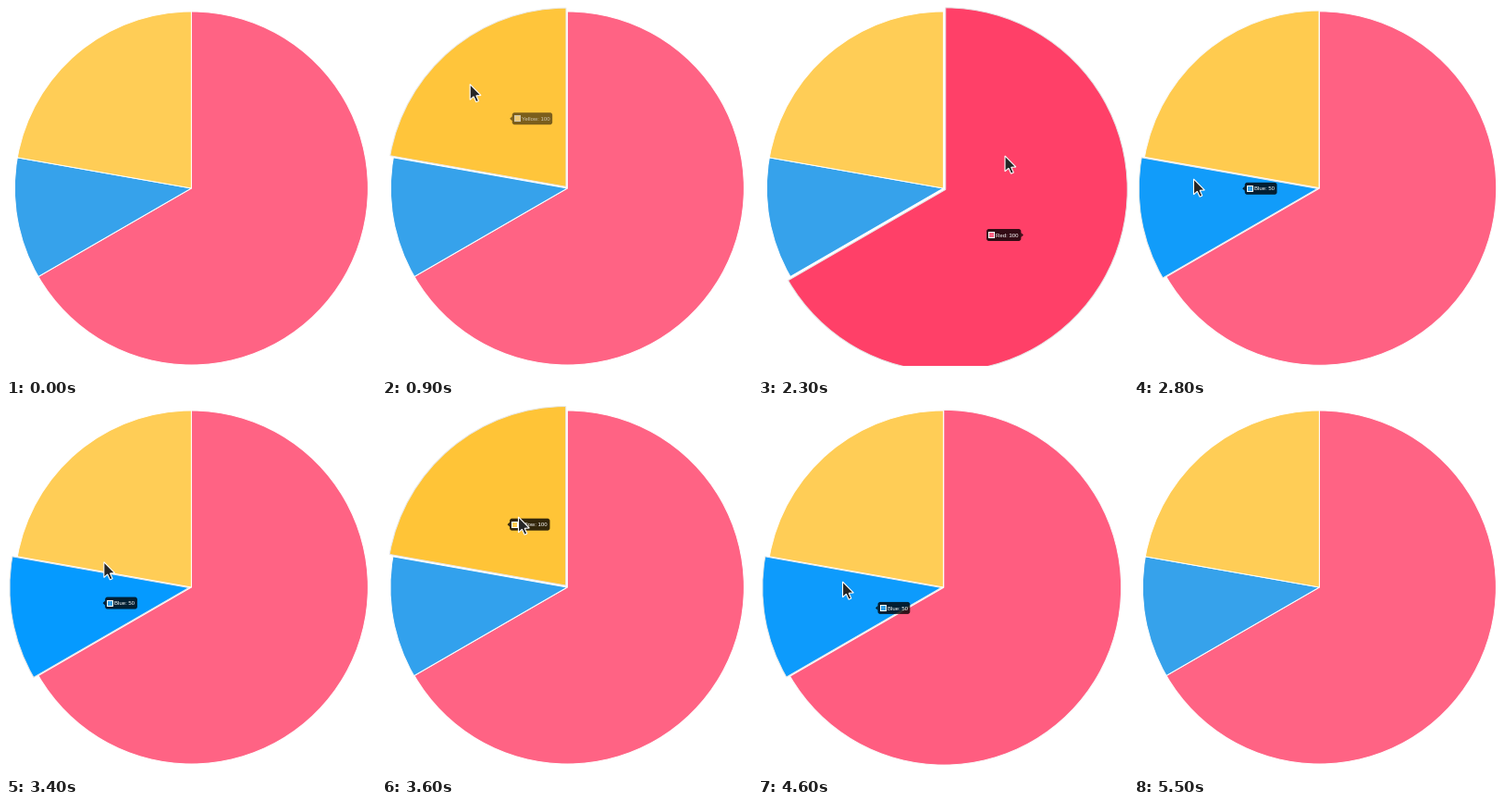
Recreate the animation shown at these times as a matplotlib script. Size 400 by 401 pixels, loop 6000 ms.

```python
import colorsys

import matplotlib.pyplot as plt
import numpy as np
from matplotlib.animation import FuncAnimation
from matplotlib.colors import to_rgb
from matplotlib.patches import FancyBboxPatch, Polygon, Rectangle, Wedge

W, H, DPI = 400, 401, 64
PX = 72 / DPI
STEP, LOOP = 100, 6000
CENTER, RADIUS = np.array([200.4, 197.0]), 191
OFFSET = 2.75
TIP_H, TIP_GAP, CARET = 13, 3.5, 2.5
FLOOR = 389.3

LABELS = ["Red", "Blue", "Yellow"]
VALUES = np.array([300, 50, 100])
COLORS = [np.array(to_rgb(c)) for c in ("#ff6384", "#36a2eb", "#ffcd56")]
RED, BLUE, YELLOW, NONE = 0, 1, 2, -1

# when the pointer enters each slice
HOVERS = [(770, YELLOW), (1473, RED), (2540, YELLOW), (2680, BLUE),
          (3413, YELLOW), (4060, RED), (4453, BLUE), (5100, YELLOW),
          (5210, NONE)]

# pointer stops: time, x, y
STOPS = np.array([
    (800, 75, 80), (1500, 216, 112), (2100, 267, 162), (2500, 267, 162),
    (2800, 64.5, 187), (3300, 85, 194), (3600, 147.5, 121),
    (4250, 236, 176), (4600, 91.5, 191), (5210, 17, 142),
])
ARROW = np.array([(0, 0), (0, 16.8), (3.9, 13.3), (6.6, 19.2), (9.3, 18),
                  (6.7, 12.3), (11.8, 12)])


def hover_color(color):
    """More saturated and a little darker."""
    h, l, s = colorsys.rgb_to_hls(*color)
    return np.array(colorsys.hls_to_rgb(h, l * 0.9, min(s * 1.5, 1)))


def ease_out(u):
    return 1 - (1 - np.clip(u, 0, 1)) ** 4


def chase(goals, pos, t, span=400):
    """Follow a list of (time, goal); each one restarts from where it is."""
    pos = np.array(pos, float)
    ends = [start for start, _ in goals[1:]] + [LOOP]
    for (start, goal), end in zip(goals, ends):
        if t <= start:
            break
        pos += (np.array(goal) - pos) * ease_out((min(t, end) - start) / span)
    return pos


fig = plt.figure(figsize=(W / DPI, H / DPI), dpi=DPI, facecolor="white")
ax = fig.add_axes([0, 0, 1, 1])
ax.set_xlim(0, W)
ax.set_ylim(H, 0)
ax.axis("off")

# slices run clockwise from the top
bounds = np.concatenate([[0], np.cumsum(VALUES)]) / VALUES.sum() * 360 - 90
mids = np.radians((bounds[:-1] + bounds[1:]) / 2)
dirs = np.column_stack([np.cos(mids), np.sin(mids)])
# slices of half the pie or more grow twice as far
growth = OFFSET * np.where(np.diff(bounds) >= 180, 2, 1)

canvas = Rectangle((0, 0), W, FLOOR, transform=ax.transData)
wedges = []
for start, end in zip(bounds[:-1], bounds[1:]):
    wedge = ax.add_patch(Wedge(CENTER, RADIUS, start, end, lw=PX,
                               joinstyle="bevel"))
    wedge.set_clip_path(canvas)
    wedges.append(wedge)

tip_box = FancyBboxPatch((0, 0), 10, TIP_H, lw=0, fc="black", zorder=5,
                         boxstyle="round,pad=0,rounding_size=2.6")
caret = Polygon(np.zeros((3, 2)), lw=0, fc="black", zorder=5)
key_frame = Rectangle((0, 0), 7, 7, lw=0, fc="white", zorder=6)
key_fill = Rectangle((0, 0), 5, 5, lw=0, zorder=7)
for patch in (tip_box, caret, key_frame, key_fill):
    ax.add_patch(patch)
tip_text = ax.text(0, 0, "", family="Liberation Sans", size=6 * PX,
                   color="white", va="baseline", zorder=7)
tip_parts = [tip_box, caret, key_frame, key_fill, tip_text]
arrow = ax.add_patch(Polygon(ARROW, fc="#262626", ec="white", lw=1.1 * PX,
                             joinstyle="miter", zorder=9))


def tip_width(i):
    tip_text.set_text(f"{LABELS[i]}: {VALUES[i]}")
    return tip_text.get_window_extent().width + 12.8


def tip_home(i):
    """Left edge and middle of the tooltip, beside the slice's midpoint."""
    x, y = CENTER + dirs[i] * (RADIUS / 2 + growth[i])
    return x - TIP_GAP - widths[i] if x > CENTER[0] else x + TIP_GAP, y


widths = [tip_width(i) for i in range(3)]
hover_goals = [(t, np.arange(3) == i) for t, i in HOVERS]
tip_goals = [(t, tip_home(i)) for t, i in HOVERS if i != NONE]


def draw_slices(t, active):
    levels = chase(hover_goals, np.zeros(3), t)
    for i, (wedge, p) in enumerate(zip(wedges, levels)):
        wedge.set_center(CENTER + dirs[i] * OFFSET * p)
        wedge.set_radius(RADIUS + growth[i] * p)
        wedge.set_facecolor(COLORS[i] + (hover_color(COLORS[i]) - COLORS[i]) * p)
        wedge.set_edgecolor([1 - 0.1 * p] * 3)
        wedge.set_zorder(3 if i == active else 1 + i / 10)


def draw_tooltip(t, i):
    first, last = HOVERS[0][0], HOVERS[-1][0]
    alpha = np.clip((t - first) / 200, 0, 1) - np.clip((t - last) / 200, 0, 1)
    key_fill.set_facecolor(COLORS[i])
    for part in tip_parts:
        part.set_visible(alpha > 0)
        part.set_alpha(alpha * (0.8 if part in (tip_box, caret) else 1))

    x, y = chase(tip_goals, tip_goals[0][1], t)
    tip_box.set_bounds(x, y - TIP_H / 2, widths[i], TIP_H)
    side, out = (x + widths[i], CARET) if dirs[i][0] > 0 else (x, -CARET)
    caret.set_xy([(side, y - CARET), (side + out, y), (side, y + CARET)])
    key_frame.set_xy((x + 2.3, y - 3.5))
    key_fill.set_xy((x + 3.3, y - 2.5))
    tip_text.set_text(f"{LABELS[i]}: {VALUES[i]}")
    tip_text.set_position((x + 10, y + 2.1))


def draw_arrow(t):
    times, xs, ys = STOPS.T
    arrow.set_visible(times[0] <= t <= times[-1])
    arrow.set_xy(ARROW + [np.interp(t, times, xs), np.interp(t, times, ys)])


def update(n):
    t = n * STEP
    past = [i for start, i in HOVERS if start <= t]
    active = past[-1] if past else NONE
    shown = next((i for i in reversed(past) if i != NONE), YELLOW)
    draw_slices(t, active)
    draw_tooltip(t, shown)
    draw_arrow(t)
    return wedges + tip_parts + [arrow]


anim = FuncAnimation(fig, update, frames=LOOP // STEP, interval=STEP,
                     repeat=True, repeat_delay=0, blit=False)
plt.show()
```
